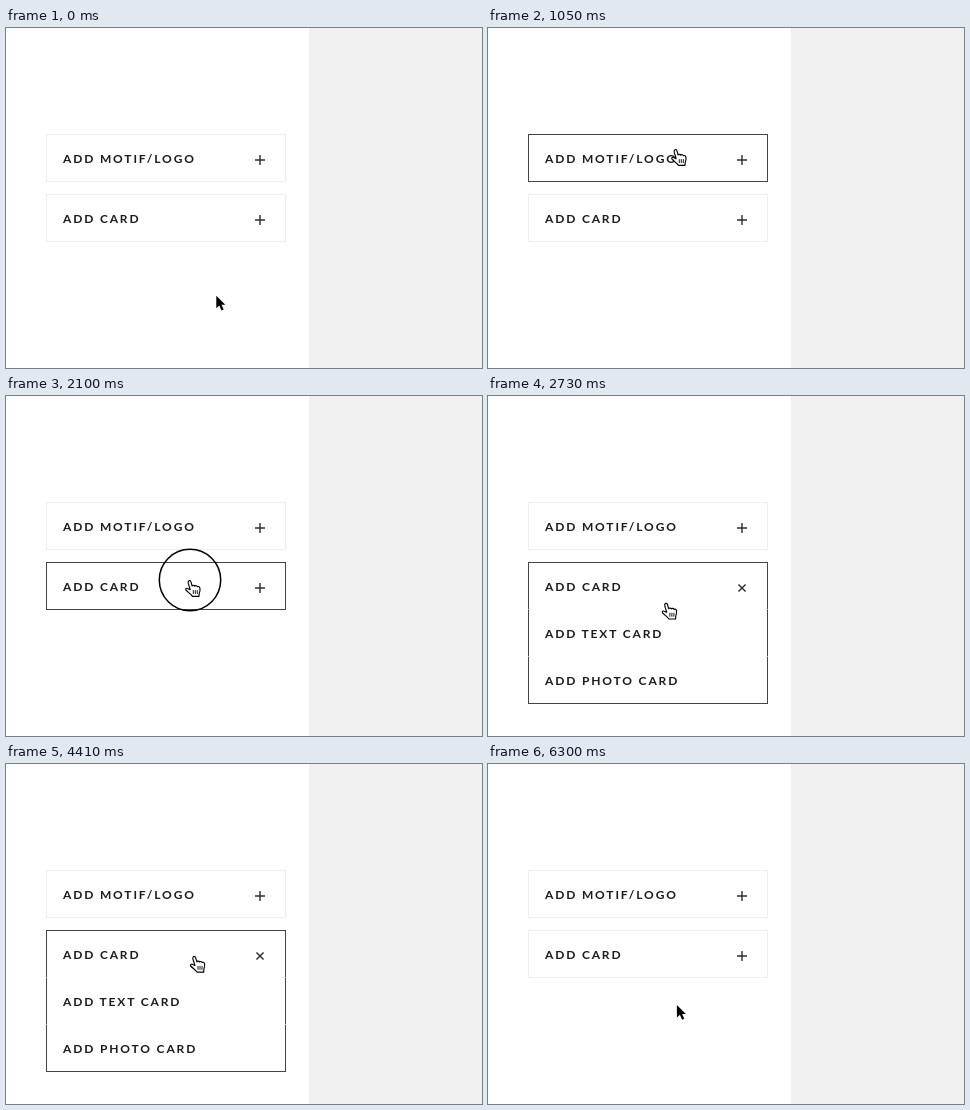
Write an HTML page that moves like this. It is 476 px wide and 340 px high and loops after 6.44 s.

```html
<!DOCTYPE html>
<html lang="en">
<head>
<meta charset="utf-8">
<title>Add card menu</title>
<style>
html, body { margin: 0; width: 100%; height: 100%; overflow: hidden; background: #fff; }
svg { display: block; }
text { font: 700 12px Lato, sans-serif; letter-spacing: 1.85px; fill: #1c1c1c; }
.box { fill: none; }
.icon { fill: none; stroke: #2c2c2c; stroke-width: 1.4; }
</style>
</head>
<body>
<svg width="476" height="340" viewBox="0 0 476 340">
  <defs>
    <clipPath id="clip"><rect id="clipBox" x="40" y="166" width="240" height="48"/></clipPath>
  </defs>
  <rect width="476" height="340" fill="#fff"/>
  <rect x="303" width="173" height="340" fill="#f0f0f0"/>

  <rect id="motifBox" class="box" x="40.5" y="106.5" width="239" height="47"/>
  <text x="57" y="135">ADD MOTIF/LOGO</text>
  <path class="icon" d="M249 132H259M254 127V137"/>

  <g clip-path="url(#clip)">
    <rect id="textItem" x="41" y="214" width="238" height="47" fill="#f0f0f0"/>
    <rect id="photoItem" x="41" y="261" width="238" height="46" fill="#f0f0f0"/>
    <text x="57" y="242">ADD TEXT CARD</text>
    <text x="57" y="289">ADD PHOTO CARD</text>
  </g>
  <rect id="cardBox" class="box" x="40.5" y="166.5" width="239" height="47"/>
  <path id="notches" d="M40 213.5h1M279 213.5h1M40 260.5h1M279 260.5h1" stroke="#aaa"/>
  <text x="57" y="195">ADD CARD</text>
  <path id="toggle" class="icon" d="M-5 0H5M0 -5V5"/>

  <circle id="ring" r="30.7" fill="none" stroke="#000" stroke-width="1.5"/>
  <g id="arrow">
    <path d="M.3 0V13L3.3 10.2 5.5 15.2 7.7 14.2 5.5 9.4H9.3Z" stroke="#fff" stroke-width="1.6" stroke-linejoin="round"/>
    <path d="M.3 .4V13L3.3 10.2 5.5 15.2 7.7 14.2 5.5 9.4H9.3Z"/>
  </g>
  <g id="hand" stroke="#000" stroke-width="1.15" stroke-linecap="round" stroke-linejoin="round">
    <path fill="#fff" d="M.2 9.6 -1.8 3.2C-2.4 .6 0 -.4 .8 1.6L2.2 6C3 5 4.4 5.2 4.8 6.2 5.7 5.3 7 5.6 7.4 6.7 8.6 6.1 9.7 6.7 9.9 8.1 10.3 10.2 10 11.5 9.2 13.2L9 16.3H2.3C1.5 14.3 -2 12.5 -4 10.2 -4.9 8.8 -3.4 7.7 -1.9 8.7Z"/>
    <path fill="none" stroke-width=".9" d="M3.3 10.5V13.6M5.3 10.5V13.6M7.3 10.5V13.6"/>
  </g>
</svg>
<script>
const LOOP = 6440, STEP = 70;
const el = id => document.getElementById(id);
const set = (id, attrs) => {
  for (const k in attrs) el(id).setAttribute(k, attrs[k]);
};
const mix = (a, b, p) => a + (b - a) * p;
const ramp = (t, a, b) => Math.min(1, Math.max(0, (t - a) / (b - a)));
const ease = p => (p + p * p * (3 - 2 * p)) / 2;

// Pointer moves: start, end, x and y reached
const start = [210, 267.3];
const moves = [
  [0, 560, 188, 186],
  [770, 1050, 188, 121],
  [1190, 1820, 184, 184],
  [2520, 3220, 163, 272],
  [3220, 3430, 159, 281],
  [3500, 4200, 184, 203],
  [4200, 4410, 188.7, 191.8],
  [5390, 5810, 188.6, 240.5]
];

function pointer(t) {
  let [x, y] = start;
  for (const [a, b, toX, toY] of moves) {
    const p = ease(ramp(t, a, b));
    x = mix(x, toX, p);
    y = mix(y, toY, p);
  }
  return [x, y];
}

const openness = t => ease(ramp(t, 2170, 2380)) - ease(ramp(t, 4690, 4900));
const cardHeight = t => mix(47, 141, openness(t));
const pulse = (t, a) => Math.min(ramp(t, a, a + 140), 1 - ramp(t, a + 210, a + 350));

const over = {
  motif: (y, t) => y >= 106 && y < 154,
  card: (y, t) => y >= 166 && y < 167 + cardHeight(t),
  text: (y, t) => openness(t) > .9 && y >= 214 && y < 261,
  photo: (y, t) => openness(t) > .9 && y >= 261 && y < 308
};

// Hover strength: share of the last few moments spent inside
function hover(name, t) {
  let sum = 0;
  for (let k = 0; k < 3; k++) {
    const s = (t - k * STEP + LOOP) % LOOP;
    if (over[name](pointer(s)[1], s)) sum++;
  }
  return sum / 3;
}

function border(p) {
  const v = Math.round(mix(238, 68, p));
  return `rgb(${v},${v},${v})`;
}

function draw(t) {
  const [x, y] = pointer(t);
  const open = openness(t), h = cardHeight(t);
  const onButton = over.motif(y, t) || over.card(y, t);
  const place = `translate(${x} ${y})`;

  set("motifBox", { stroke: border(hover("motif", t)) });
  set("cardBox", { stroke: border(hover("card", t)), height: h });
  set("clipBox", { height: h });
  set("textItem", { opacity: hover("text", t) });
  set("photoItem", { opacity: hover("photo", t) });
  set("notches", { opacity: open > .99 ? 1 : 0 });
  set("toggle", { transform: `translate(254 192) rotate(${45 * open})` });
  set("ring", { cx: x, cy: y, opacity: Math.max(pulse(t, 1960), pulse(t, 4550)) });
  set("arrow", { transform: place, opacity: onButton ? 0 : 1 });
  set("hand", { transform: place, opacity: onButton ? 1 : 0 });
}

const begin = performance.now();
function frame(now) {
  const t = Math.max(0, now - begin) % LOOP;
  draw(Math.floor(t / STEP) * STEP);
  requestAnimationFrame(frame);
}
draw(0);
requestAnimationFrame(frame);
</script>
</body>
</html>
```
